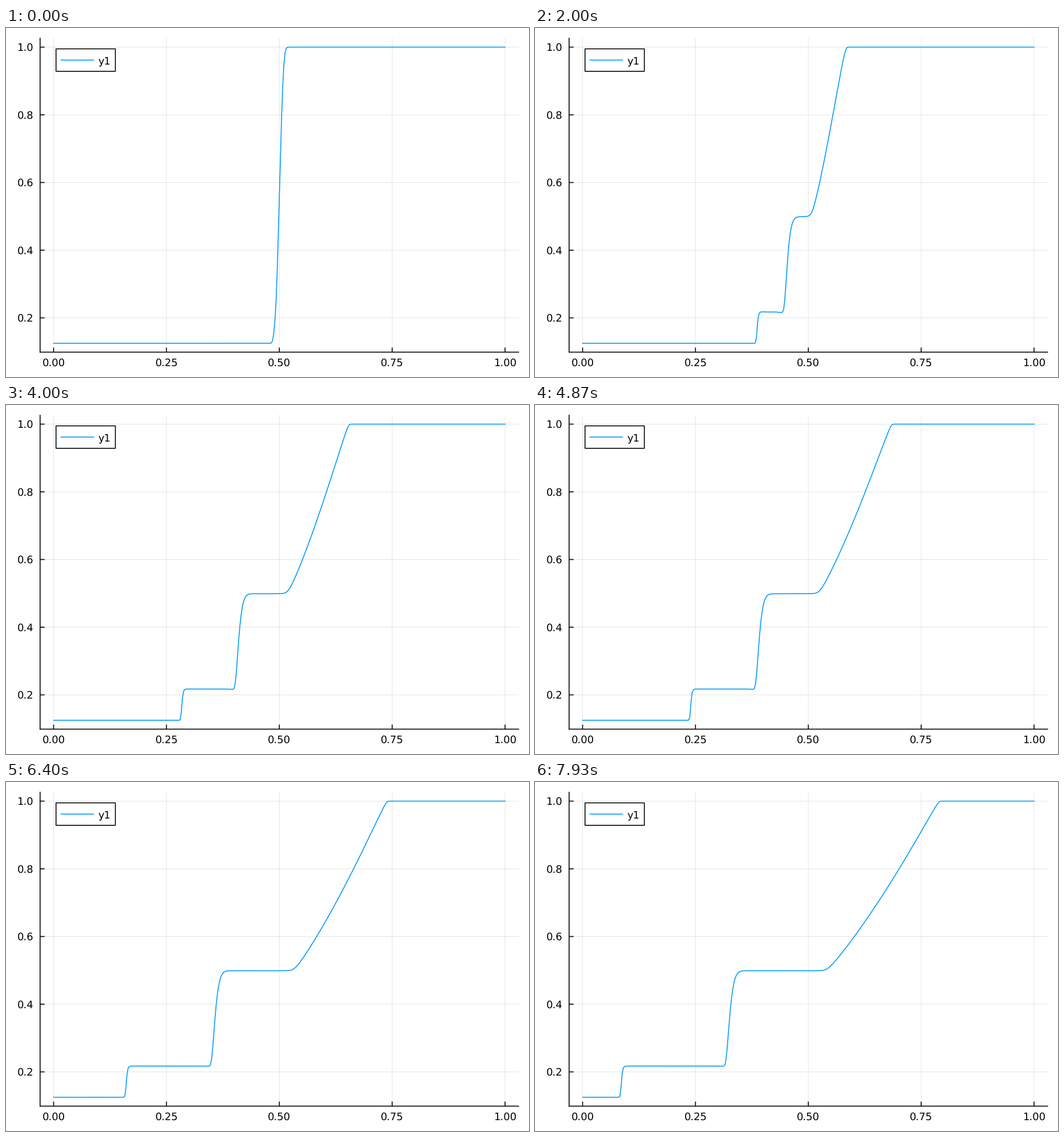
Animation of 917 by 611 pixels, one loop 8000 ms. Source, as a matplotlib script:

```python
import math

import numpy as np
import matplotlib.pyplot as plt
from matplotlib.animation import FuncAnimation
from matplotlib.patches import Rectangle

W, H, DPI = 917, 611, 100
FRAMES, LOOP_MS = 120, 8000
BLUE = "#009af9"

# Gas tube: dense gas on the right expands into thin gas on the left.
GAMMA = 5 / 3
CELLS = 400
FRAME_TIME = 0.00181
SUBSTEPS = 4
LEAD_STEPS = 11     # the tube has already opened when the loop starts
EDGE = 0.006        # softness of the first density step


def pt(px):
    return px * 72 / DPI


def slopes(w):
    """Van Leer limited slopes, zero at both ends."""
    a = w[:, 1:-1] - w[:, :-2]
    b = w[:, 2:] - w[:, 1:-1]
    ab = a * b
    s = np.zeros_like(w)
    s[:, 1:-1] = np.where(ab > 0, 2 * ab / np.where(ab > 0, a + b, 1), 0)
    return s


def flux(left, right):
    """HLLC flux for mass, momentum and advected entropy."""
    (rl, ul, pl), (rr, ur, pr) = left, right
    cl, cr = np.sqrt(GAMMA * pl / rl), np.sqrt(GAMMA * pr / rr)
    sl = np.minimum(ul - cl, ur - cr)
    sr = np.maximum(ul + cl, ur + cr)
    ml, mr = rl * (sl - ul), rr * (sr - ur)
    sm = (pr - pl + ml * ul - mr * ur) / (ml - mr)

    def side(r, u, p, s):
        q = np.array([r, r * u, p ** (1 / GAMMA)])
        f = q * u
        f[1] += p
        k = (s - u) / (s - sm)
        star = np.array([r * k, r * k * sm, q[2] * k])
        return f, f + s * (star - q)

    fl, fl_star = side(rl, ul, pl, sl)
    fr, fr_star = side(rr, ur, pr, sr)
    inner = np.where(sm >= 0, fl_star, fr_star)
    return np.where(sl >= 0, fl, np.where(sr <= 0, fr, inner))


def rate(q, dx):
    w = np.array([q[0], q[1] / q[0], q[2] ** GAMMA])
    half = slopes(w) / 2
    f = flux((w + half)[:, :-1], (w - half)[:, 1:])
    out = np.zeros_like(q)
    out[:, 1:-1] = (f[:, :-1] - f[:, 1:]) / dx
    return out


def simulate():
    x = np.linspace(0, 1, CELLS + 1)
    dx = x[1]
    dt = FRAME_TIME / SUBSTEPS

    def advance(q, steps):
        for _ in range(steps):
            q1 = q + dt * rate(q, dx)
            q = (q + q1 + dt * rate(q1, dx)) / 2
        return q

    rho = np.array([0.5625 + 0.4375 * math.erf((v - 0.5) / EDGE) for v in x])
    q = advance(np.array([rho, 0 * rho, rho ** (1 / GAMMA)]), LEAD_STEPS)
    history = [q[0]]
    for _ in range(FRAMES - 1):
        q = advance(q, SUBSTEPS)
        history.append(q[0])
    return x, history


def px_x(v):
    return 83.5 + 791.5 * v


def px_y(v):
    return 33.5 + 592.5 * (1 - v)


plt.rcParams.update({"font.family": "DejaVu Sans", "path.snap": False,
                     "text.hinting": "none"})
fig = plt.figure(figsize=(W / DPI, H / DPI), dpi=DPI, facecolor="white")
ax = fig.add_axes([0, 0, 1, 1])
ax.set_xlim(0, W)
ax.set_ylim(H, 0)
ax.axis("off")

LEFT, RIGHT = px_x(-0.03), px_x(1.03)
TOP, BOTTOM = px_y(1.02625), px_y(0.09875)


def line(xs, ys, color="black", width=1.6, **kw):
    return ax.plot(xs, ys, color=color, lw=pt(width), **kw)[0]


def label(x, y, s, ha, **kw):
    ax.text(x, y, s, ha=ha, va="baseline", fontsize=pt(18), color="black", **kw)


for v in (0, 0.25, 0.5, 0.75, 1):
    x = px_x(v)
    line([x, x], [TOP, BOTTOM], width=1, alpha=0.1)
    line([x, x], [BOTTOM, BOTTOM - 8], solid_capstyle="butt")
    label(x, 592, f"{v:.2f}", "center")

for v in (0.2, 0.4, 0.6, 0.8, 1):
    y = px_y(v)
    line([LEFT, RIGHT], [y, y], width=1, alpha=0.1)
    line([LEFT, LEFT + 8], [y, y], solid_capstyle="butt")
    label(48, y + 6.5, f"{v:.1f}", "right")

line([LEFT, LEFT], [TOP, BOTTOM])
line([LEFT, RIGHT], [BOTTOM, BOTTOM])

ax.add_patch(Rectangle((87.7, 36.5), 104, 39.3, facecolor="white",
                       edgecolor="black", lw=pt(1.6), joinstyle="round",
                       zorder=3))
line([96.5, 153.5], [56.2, 56.2], BLUE, zorder=4)
label(161.5, 63, "y1", "left", zorder=4)

grid, density = simulate()
curve = line(px_x(grid), px_y(density[0]), BLUE, zorder=2.5,
             solid_joinstyle="round")


def update(i):
    curve.set_ydata(px_y(density[i]))
    return (curve,)


anim = FuncAnimation(fig, update, frames=FRAMES, interval=LOOP_MS / FRAMES,
                     init_func=lambda: update(0), repeat=True, repeat_delay=0)
plt.show()
```
